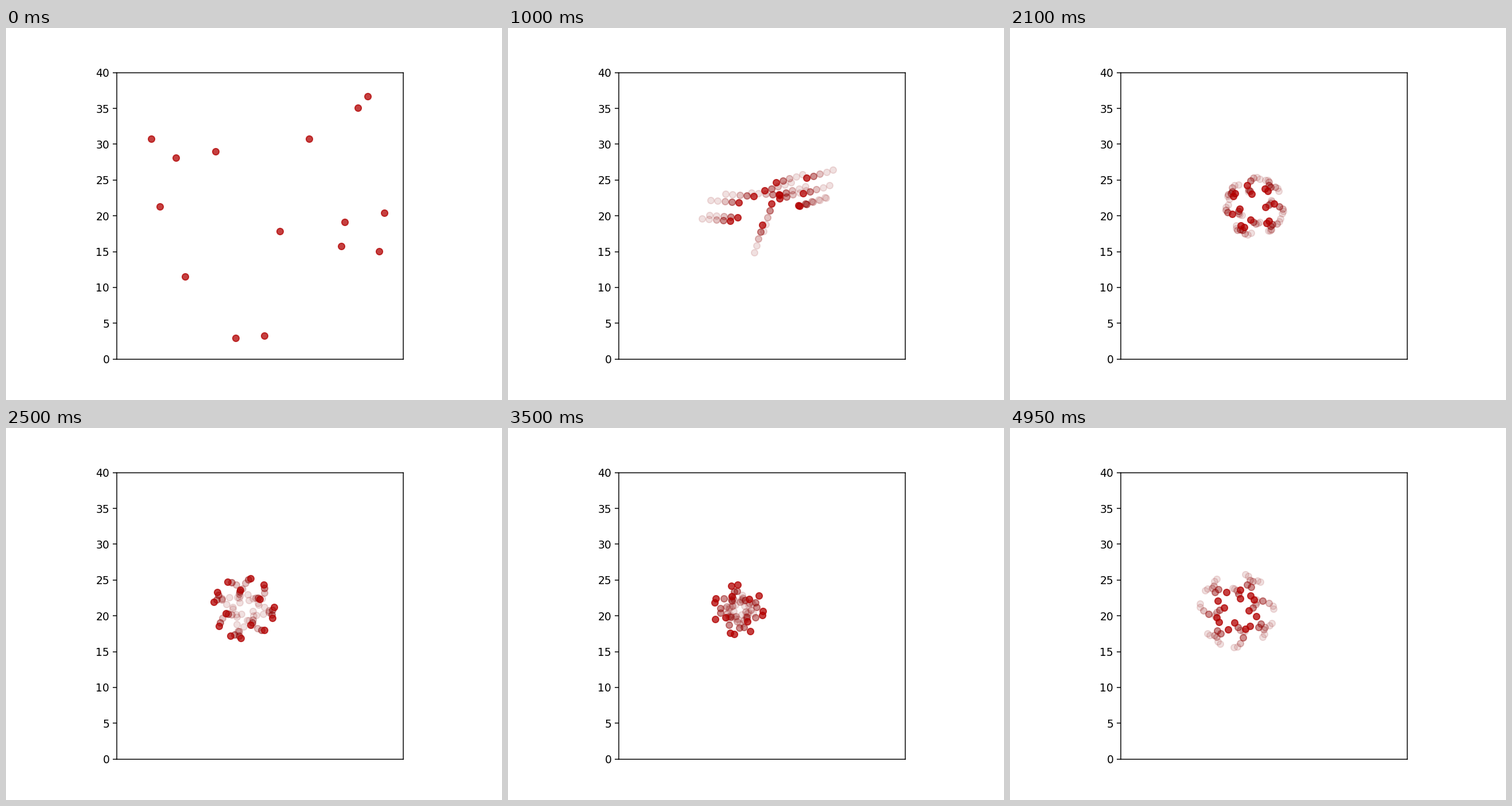
Write a matplotlib script that moves like this. It is 864 px wide and 648 px high and loops after 5000 ms.

```python
import numpy as np
import matplotlib.pyplot as plt
from matplotlib.animation import FuncAnimation

FRAMES, INTERVAL = 100, 50
TRAIL = 4                    # ghosts behind each particle
ARRIVE, MEET, SWING = 16, 20, 29
HALF_SWING = 11.2            # frames from one side of the centre to the other
PEAK = 28                    # first time the swarm is widest

# Three streams fall inwards: step per frame, then start and meeting point
# of each particle, all in stage pixels.
streams = [
    ((-11.5, 3.4), [
        (613, 139, 520, 261), (528, 193, 467, 269), (630, 119, 514, 288),
        (477, 354, 447, 283), (590, 338, 472, 290), (584, 380, 473, 297),
        (659, 322, 506, 309), (650, 389, 508, 310)]),
    ((12.2, 1.0), [
        (253, 193, 387, 336), (268, 311, 400, 330), (296, 226, 402, 304),
        (365, 215, 428, 293), (312, 433, 473, 291)]),
    ((3.5, -12.0), [
        (450, 536, 459, 306), (400, 540, 443, 343)]),
]
start = np.array([row[:2] for _, rows in streams for row in rows], float)
meet = np.array([row[2:] for _, rows in streams for row in rows], float)
step = np.array([s for s, rows in streams for _ in rows])

# The swarm then swings through its centre, evenly spread over all
# directions, with every fourth particle on a shorter path.
count = len(start)
index = np.arange(count)
angle = np.radians(99) + 2 * np.pi * index / count
radius = np.where(index % 4 == 0, 36, 60)[:, None]
along = radius * np.column_stack([np.cos(angle), -np.sin(angle)])
across = 0.3 * along[:, ::-1] * (1, -1) * np.where(index % 2, 1, -1)[:, None]


def smooth(s):
    s = np.clip(s, 0, 1)
    return s * s * (3 - 2 * s)


def fall(t):
    """Curve in from the start, then follow the stream in a straight line."""
    if t >= ARRIVE:
        return meet + step * (t - MEET)
    s = t / ARRIVE
    end = meet + step * (ARRIVE - MEET)
    bend = 0.5 * s * (1 - s) ** 2 - s * s * (1 - s)
    return start + (end - start) * smooth(s) + step * ARRIVE * bend


def swing(t):
    drift = np.exp(-(t - PEAK) / 25)
    centre = np.array([391 + 55 * drift, 318.5 - 12.5 * drift])
    size = 0.8 + 0.3 * (t - PEAK) / (FRAMES - PEAK)
    phase = np.pi * (t - PEAK) / HALF_SWING
    return centre + size * (along * np.cos(phase) + across * np.sin(phase))


def positions(t):
    """Particle places at frame t in data units."""
    w = smooth((t - MEET) / (SWING - MEET))
    pix = (1 - w) * fall(t) + w * swing(t)
    return (pix - (193.3, 576.7)) * (1, -1) / 12.474


path = [positions(t) for t in range(FRAMES)]

fig, ax = plt.subplots(figsize=(6.4, 4.8), dpi=135)
ax.set(xlim=(0, 40), ylim=(0, 40), aspect="equal",
       xticks=[], yticks=range(0, 41, 5))

# Oldest ghosts first, so that the particles lie on top.
styles = [("#8b0000", 0.12), ("#8b0000", 0.12), ("#8b0000", 0.24),
          ("#900000", 0.45), ("#b20000", 0.75)]
layers = [ax.plot([], [], "o", color=c, alpha=a, markersize=6)[0]
          for c, a in styles]


def update(frame):
    for age, layer in zip(range(TRAIL, -1, -1), layers):
        t = frame - age
        points = path[t] if t >= 0 else np.empty((0, 2))
        layer.set_data(points[:, 0], points[:, 1])
    return layers


anim = FuncAnimation(fig, update, frames=FRAMES, interval=INTERVAL,
                     init_func=lambda: update(0), repeat=True)
plt.show()
```
